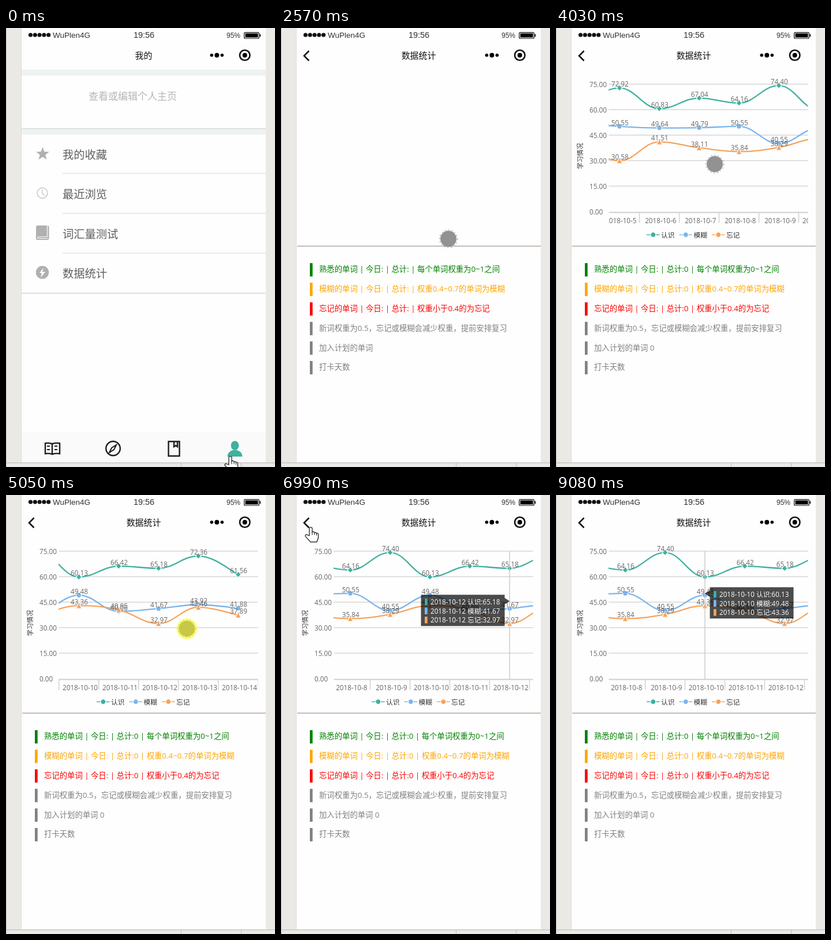
An HTML page with a canvas that plays this animation: 466x758 px, repeating every 9480 ms.

```html
<!DOCTYPE html>
<html lang="zh-CN">
<head>
<meta charset="utf-8">
<title>数据统计</title>
<style>
html, body { margin: 0; width: 100%; height: 100%; overflow: hidden; background: #ebe9e6; }
canvas { display: block; }
</style>
</head>
<body>
<canvas id="stage" width="466" height="758"></canvas>
<script>
const g = document.getElementById('stage').getContext('2d');
const LOOP = 9480, OPEN = 1780, LOADED = 2640, GONE = 9060;
const CJK = '"Noto Sans CJK SC", "Noto Sans CJK", sans-serif';
const UI = '"Liberation Sans", ' + CJK;
const CHART = '"Open Sans", "Noto Sans", ' + CJK;
const TEAL = '#3eb1a0', GRAY = '#b0b0b0';

// Chart geometry and data
const L = 91.5, R = 436.5, STEP = (R - L) / 5, AXIS = 318.5;
const yOf = v => 319.5 - v * 2.96;
const dateOf = i => '2018-10-' + (i + 1);

// Four swaying days lead into the listed ones
function series(name, color, sway, days) {
  const lead = [4, 3, 2, 1].map(n => days[0] + sway * Math.sin(n * 1.9));
  return { name, color, data: [...lead, ...days] };
}
const SERIES = [
  series('认识', TEAL, -7, [72.92, 60.83, 67.04, 64.16, 74.4, 60.13, 66.42, 65.18, 72.36, 61.56]),
  series('模糊', '#7cb5ec', 2, [50.55, 49.64, 49.79, 50.55, 40.55, 49.48, 40.06, 41.67, 43.92, 41.88]),
  series('忘记', '#f7a35c', 6, [30.58, 41.51, 38.11, 35.84, 38.29, 43.36, 40.95, 32.97, 42.46, 37.89])
];
const MAX_SCROLL = SERIES[0].data.length * STEP - (R - L);

// What the pointer does, in order
const START = { x: 387, y: 740 };
const steps = [];
const move = (t0, t1, x, y, down = false) => steps.push({ t0, t1, x, y, down });
const drag = (t0, t1, x, y) => move(t0, t1, x, y, true);
const tap = t => move(t, t + 80, steps.at(-1).x, steps.at(-1).y, true);

move(70, 530, 209, 404);
move(690, 770, 191, 422);
tap(1460);
move(2160, 2570, 290, 364);
move(2570, 3090, 351, 235);
drag(3170, 3650, 59, 235);
move(3650, 4030, 275, 235);
move(4260, 4420, 435, 231);
drag(4420, 4800, 24, 231);
move(4800, 5040, 313, 231);
drag(5040, 5500, 445, 190);
move(5500, 5580, 410, 188);
tap(5600);
move(5680, 5960, 30, 51);
tap(6240);
tap(6380);
move(6680, 6760, 50, 56);
move(6990, 7060, 160, 140);
tap(7210);
move(7300, 7680, 205, 131);
move(7690, 8150, 240, 170);
tap(8220);
move(8300, 8690, 97, 127);
move(8840, GONE, 389, 742);

const clamp = (v, a, b) => Math.min(b, Math.max(a, v));
const ease = p => p * p * (3 - 2 * p);

// Replays the steps up to t: drags scroll the chart, taps pick a day
function stateAt(t) {
  let { x, y } = START, scroll = 0, tip = -1, down = false;
  for (const s of steps) {
    if (t < s.t0) break;
    const p = ease(Math.min(1, (t - s.t0) / (s.t1 - s.t0)));
    const nx = x + (s.x - x) * p;
    if (s.down && y > 75 && y < 340) {
      if (s.x !== x) {
        tip = -1;
        scroll = clamp(scroll + x - nx, 0, MAX_SCROLL);
      } else if (p === 1) tip = Math.floor((x - L + scroll) / STEP);
    }
    x = nx;
    y += (s.y - y) * p;
    down = s.down && p < 1;
  }
  return { x, y, scroll, tip, down };
}

// y is the vertical middle of the glyphs
function text(s, x, y, size, color, align = 'left', font = UI) {
  g.font = `${size}px ${font}`;
  g.fillStyle = color;
  g.textAlign = align;
  g.fillText(s, x, y + size * 0.37);
}
const label = (s, x, y, align, color = '#666') => text(s, x, y, 11.7, color, align, CHART);
function box(x, y, w, h, color) { g.fillStyle = color; g.fillRect(x, y, w, h); }
function dot(x, y, r, color) {
  g.fillStyle = color;
  g.beginPath(); g.arc(x, y, r, 0, 7); g.fill();
}
function ring(x, y, r, color, w) {
  g.strokeStyle = color; g.lineWidth = w;
  g.beginPath(); g.arc(x, y, r, 0, 7); g.stroke();
}
function fill(d, color) { g.fillStyle = color; g.fill(new Path2D(d)); }
function line(d, color, w) { g.strokeStyle = color; g.lineWidth = w; g.stroke(new Path2D(d)); }
function at(x, y, paint) {
  g.save();
  g.translate(x, y);
  paint();
  g.restore();
}

function frame(title) {
  box(0, 0, 466, 758, '#ebe9e6');
  box(0, 0, 1, 758, '#c4c2bf');
  box(26, 0, 1, 750, '#dedcd9');
  box(27, 0, 423, 750, '#fefefe');
  box(0, 750, 466, 1.5, '#c9c7c4');
  for (const x of [303, 407]) box(x, 751, 1, 7, '#c0beba');
  for (let i = 0; i < 5; i++) dot(42.5 + i * 7.8, 12, 3.6, '#111');
  text('WuPlen4G', 81, 12, 13.5, '#333');
  text('19:56', 239, 12, 14.4, '#333', 'center');
  text('95%', 382, 13, 12, '#333');
  g.strokeStyle = '#111'; g.lineWidth = 1.2;
  g.beginPath(); g.roundRect(412.6, 7.6, 25.8, 10.4, 2); g.stroke();
  box(414.5, 9.3, 22, 7, '#000');
  box(439.5, 10.5, 1.8, 4.5, '#111');
  text(title, 238.5, 47.5, 14.9, '#111', 'center');
  for (const i of [-1, 0, 1]) dot(365.3 + i * 9, 47, i ? 2.8 : 4, '#000');
  ring(413.7, 47, 8.8, '#111', 2.6);
  dot(413.7, 47, 4, '#000');
}

function minePage() {
  frame('我的');
  box(27, 72, 423, 10, '#eef2f2');
  box(27, 173, 423, 11, '#eef2f2');
  box(27, 173, 423, 1.5, '#d8dcdc');
  text('查看或编辑个人主页', 143, 118, 17, '#b5b5b5');
  ['我的收藏', '最近浏览', '词汇量测试', '数据统计'].forEach((s, i) => {
    text(s, 98, 218.5 + i * 68.5, 19.3, '#5f5f5f');
    if (i < 3) box(98, 250.5 + i * 68.7, 352, 1.5, '#e4e4e4');
  });
  box(27, 457, 423, 1.8, '#dcdcdc');

  g.fillStyle = GRAY;
  g.beginPath();
  for (let i = 0; i < 10; i++) {
    const a = i * Math.PI / 5, r = i % 2 ? 5 : 12;
    g.lineTo(63.5 + r * Math.sin(a), 217.5 - r * Math.cos(a));
  }
  g.fill();
  ring(63, 285, 9, '#c4c4c4', 1.4);
  line('M63 279V286l4 3', '#c4c4c4', 1.4);
  g.fillStyle = GRAY;
  g.beginPath(); g.roundRect(52, 341, 22.5, 25, 3); g.fill();
  line('M71.5 341V360.5H56q-3 1.5 0 3H72.5', '#fff', 1.2);
  dot(63, 422, 11.2, GRAY);
  fill('M65 414l-7 9h4l-2 8 8-10h-5z', '#fff');

  box(27, 697, 423, 53, '#fafafa');
  const ink = '#1c1c1c';
  line('M80 718V736M80 718q-6-2-12-1V735q7-1 12 1q6-2 13-1V717q-7-1-13 1', ink, 2.4);
  line('M71 722h5M71 728h5M84 722h5M84 728h5', ink, 2);
  ring(185.5, 726, 12.3, ink, 2.4);
  line('M191 720l-4 8-8 5 4-8z', ink, 2);
  line('M281.5 714h19v25h-19zM291 714v9l3-2 3 2v-9', ink, 2.4);
  g.fillStyle = TEAL;
  g.beginPath(); g.ellipse(396.5, 721, 6.8, 8, 0, 0, 7); g.fill();
  fill('M383.5 740q0-8 9-11h8q9 3 9 11z', TEAL);
}

const DIAMOND = 'M0-5L-5 0 0 5 5 0z';
const DISC = 'M4.5 0A4.5 4.5 0 1 1-4.5 0A4.5 4.5 0 1 1 4.5 0z';
const TRIANGLE = 'M0-5L-5 5H5z';
const SHAPES = [DIAMOND, DISC, TRIANGLE];
const marker = (shape, x, y, color) => at(x, y, () => {
  fill(shape, color);
  line(shape, '#fff', 1.1);
});

// Smooth line whose tangents are flat at local peaks and dips
function curve(p) {
  const turns = i => p[i - 1] && p[i + 1] &&
    (p[i].y - p[i - 1].y) * (p[i + 1].y - p[i].y) <= 0;
  const handle = i => {
    const a = p[i - 1] || p[i], b = p[i + 1] || p[i];
    return { x: (b.x - a.x) * 0.2, y: turns(i) ? 0 : (b.y - a.y) * 0.2 };
  };
  g.beginPath();
  g.moveTo(p[0].x, p[0].y);
  for (let i = 0; i < p.length - 1; i++) {
    const a = p[i], b = p[i + 1], u = handle(i), v = handle(i + 1);
    g.bezierCurveTo(a.x + u.x, a.y + u.y, b.x - v.x, b.y - v.y, b.x, b.y);
  }
  g.stroke();
}

function chart(t, { scroll, tip }) {
  const grow = Math.min(1, (t - LOADED) / 500) ** 3;
  const xOf = i => L + STEP / 2 + i * STEP - scroll;
  for (let i = 0; i < 6; i++) {
    const y = 97 + 44 * i;
    if (i < 5) box(L, y - 1, R - L, 2, '#e0e0e0');
    label((75 - 15 * i).toFixed(2), 58, y + 0.7, 'left');
  }
  box(L, AXIS - 1, R - L, 2, '#cfcfcf');
  at(42, 221, () => {
    g.rotate(-Math.PI / 2);
    text('学习情况', 0, 0, 11.2, '#333', 'center', CHART);
  });

  g.save();
  g.beginPath(); g.rect(L - 0.5, 75, R - L + 0.5, 265); g.clip();
  SERIES[0].data.forEach((_, i) => {
    box(xOf(i) + STEP / 2 - 0.7, AXIS, 1.4, 18, '#cfcfcf');
    label(dateOf(i), xOf(i) + 2.3, 332.5, 'center');
  });
  SERIES.forEach((s, k) => {
    const pts = s.data.map((v, i) => ({ x: xOf(i), y: yOf(v * grow) }));
    g.strokeStyle = s.color; g.lineWidth = 2.3;
    curve(pts);
    pts.forEach(p => marker(SHAPES[k], p.x, p.y, s.color));
  });
  if (grow === 1) SERIES.forEach(s => s.data.forEach((v, i) =>
    label(v.toFixed(2), xOf(i) + 0.7, yOf(v) - 6.5, 'center')));
  g.restore();

  SERIES.forEach((s, k) => {
    const x = 157 + k * 56.5;
    box(x, 356.3, 22.5, 1.4, s.color);
    marker(DISC, x + 11.3, 357, s.color);
    label(s.name, x + 25, 357.5, 'left', '#333');
  });
  if (tip >= 0) tooltip(tip, xOf(tip));
}

function tooltip(day, x) {
  const w = day < 9 ? 139 : 145, right = x + 8.5 + w < R;
  const left = right ? x + 8.5 : x - 8.5 - w;
  const top = SERIES.reduce((sum, s) => sum + yOf(s.data[day]), 0) / 3 - 9.4;
  const edge = right ? left : left + w;
  box(x - 0.7, 97, 1.4, AXIS - 97, '#c8c8c8');
  g.fillStyle = 'rgba(0,0,0,.7)';
  g.beginPath();
  g.rect(left, top, w, 54);
  g.moveTo(x, top + 11); g.lineTo(edge, top + 5.5); g.lineTo(edge, top + 16.5);
  g.fill();
  SERIES.forEach((s, k) => {
    const y = top + 12.7 + k * 15.6;
    box(left + 6.5, y - 6, 4.7, 11.5, s.color);
    label(`${dateOf(day)} ${s.name}:${s.data[day].toFixed(2)}`, left + 16.5, y, 'left', '#fff');
  });
}

function statsPage(t, state) {
  frame('数据统计');
  line('M48.5 39.5L40 48l8.5 8.5', '#111', 2.6);
  box(28, 375.8, 422, 1.6, '#b3aaa4');
  const n = t >= LOADED ? '0' : '';
  [
    ['green', `熟悉的单词 | 今日: | 总计:${n} | 每个单词权重为0~1之间`],
    ['orange', `模糊的单词 | 今日: | 总计:${n} | 权重0.4~0.7的单词为模糊`],
    ['red', `忘记的单词 | 今日: | 总计:${n} | 权重小于0.4的为忘记`],
    ['gray', '新词权重为0.5，忘记或模糊会减少权重，提前安排复习'],
    ['gray', '加入计划的单词 ' + n],
    ['gray', '打卡天数']
  ].forEach(([color, s], i) => {
    const y = 416.5 + i * 33.8;
    box(50, y - 10.5, 4.7, 23, color);
    text(s, 66, y, 13.35, color, 'left', CHART);
  });
  if (n) chart(t, state);
}

const HAND = 'M-1 14V1q2.5-3 5 0V8q2.5-2 4 1q2.5-1 3.5 1q3-1 3 2v6l-2.5 7H1l-9-10q0-4 4-2z';
const ARROW = 'M0 0V25l6-5 4 8 4-2-4-8h8z';

function pointer({ x, y, down }) {
  const hand = y > 697 || (y < 72 && x > 38 && x < 62);
  if (hand || y < 72) {
    at(x, y, () => {
      fill(hand ? HAND : ARROW, '#fff');
      line(hand ? HAND : ARROW, '#111', 1.2);
      if (hand) line('M4 8v5M8 9v4M11.5 10v4', '#111', 1);
    });
  } else {
    dot(x, y, 14, 'rgba(138,138,138,.93)');
    g.setLineDash([2, 4]);
    ring(x, y, 15.5, '#777', 1);
    g.setLineDash([]);
  }
  if (down) dot(x, y, 18, 'rgba(255,255,0,.5)');
}

function draw() {
  const t = performance.now() % LOOP, state = stateAt(t);
  if (t < OPEN) minePage(); else statsPage(t, state);
  if (t < GONE) pointer(state);
  requestAnimationFrame(draw);
}
draw();
</script>
</body>
</html>
```
